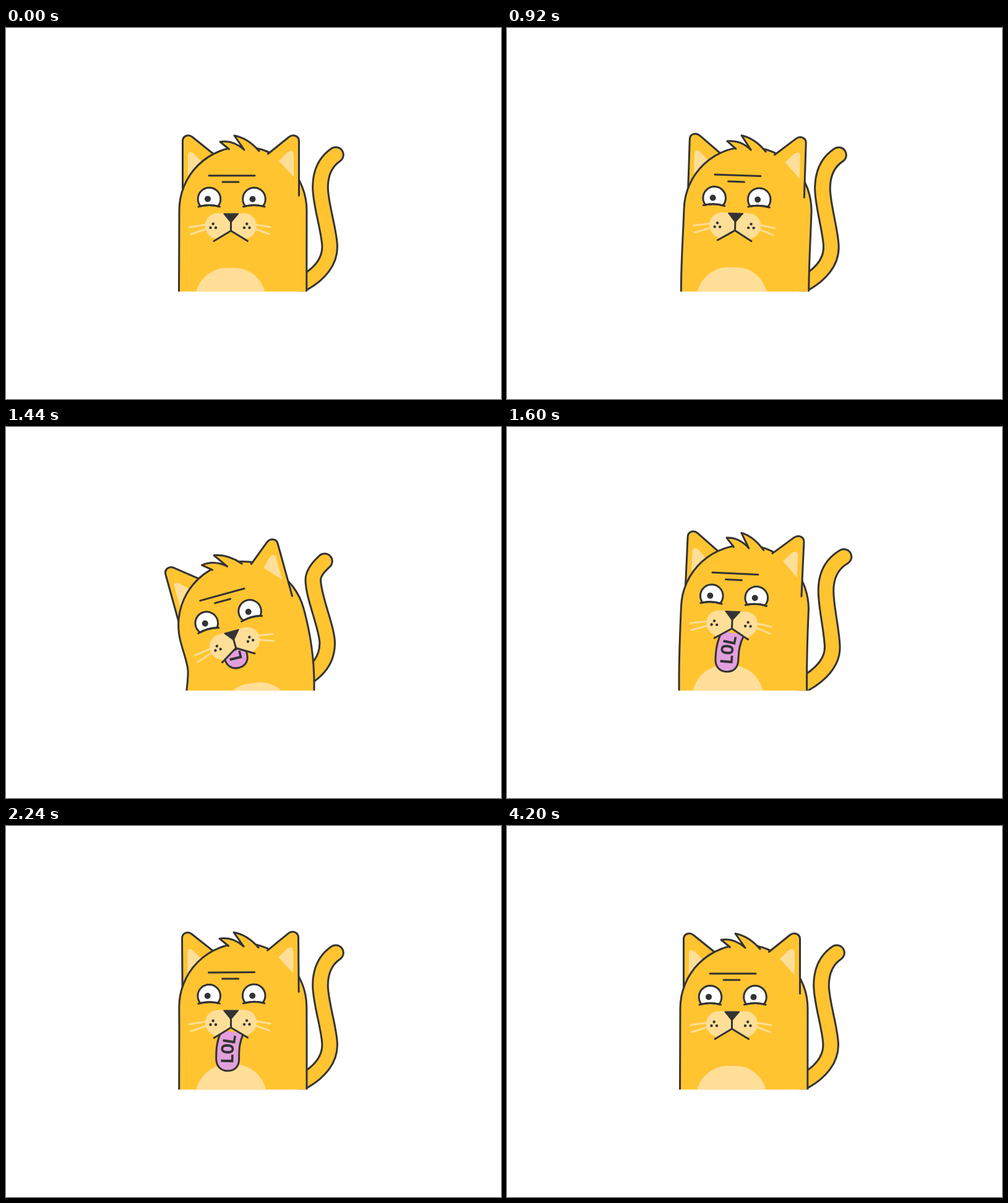
Write an HTML page that moves like this. It is 800 by 600 pixels and loops after 4.6 s.

```html
<!DOCTYPE html>
<html lang="en">
<head>
<meta charset="utf-8">
<title>Cat sticking out its tongue</title>
<style>
  html, body { margin: 0; width: 100%; height: 100%; overflow: hidden; background: #fff; }
  svg { display: block; width: 100%; height: 100%; }
  .line { fill: none; stroke: #333; stroke-width: 3; stroke-linecap: round; stroke-linejoin: round; }
  .fur { fill: #ffc430; }
  .cream { fill: #ffde98; }
  .dark { fill: #333; }
  .white { fill: #fff; }
  .pink { fill: #e29fdc; }
  .whisker { fill: none; stroke: #ffde98; stroke-width: 3; stroke-linecap: round; }
  .tail { fill: none; stroke-linecap: round; }
  .letters { font: 600 28px "Noto Sans Mono", monospace; fill: #333; text-anchor: middle; }
</style>
</head>
<body>
<svg viewBox="0 0 800 600">
  <defs>
    <clipPath id="floor"><rect width="800" height="426.2"/></clipPath>
    <clipPath id="mouth"><path d="M363.5 328L330 347.6V420H397V347.6Z"/></clipPath>
    <g id="eye">
      <path class="line white" d="M-14.2 11.6A18.3 18.3 0 1 1 14.2 11.6Q0 8.4 -14.2 11.6Z"/>
      <path class="line" d="M-17.5 12.5Q0 7.5 17 12.5"/>
    </g>
    <g id="dots" class="dark">
      <circle cy="-6" r="2.2"/><circle cx="-4.2" cy=".2" r="2.2"/><circle cx="4.3" cy=".2" r="2.2"/>
    </g>
  </defs>

  <g clip-path="url(#floor)">
    <path class="tail" stroke="#333" stroke-width="27.6"/>
    <path class="tail" stroke="#ffc430" stroke-width="21.6"/>

    <g class="head">
      <path class="line fur" d="M285.5 275V183C285.5 174.5 294.5 171 301.5 176.5L340 207.5"/>
      <path class="cream" d="M294 250V207Q294 197 303 202.5L322 222Z"/>
    </g>

    <path id="body" class="line fur"/>
    <path id="belly" class="cream" d="M305 480L307 426C315 401 336 388 356 388H370C390 388 411 401 418.5 426L420.5 480Z"/>

    <g class="head">
      <path class="line fur" d="M423.5 203.5L457 176.5C464 171 473.5 174.5 473.5 183V271"/>
      <path class="cream" d="M465 241L441 215L455 201Q465 195 465 206Z"/>
      <path id="hairFill" class="fur"/>
      <path id="hair" class="line"/>
      <path class="line" d="M328 238.8H402M350 249H376"/>

      <use href="#eye" x="328.5" y="276.5"/>
      <use href="#eye" x="401" y="276.5"/>
      <g id="pupils" class="dark">
        <circle cx="326" cy="276.4" r="5"/><circle cx="398.5" cy="276.8" r="5"/>
      </g>

      <path class="whisker" d="M296.5 322L324 318M298.5 333.5L324 325M403 318L427 322M403 325L425.5 333.3"/>
      <path class="cream" d="M343 299.5C331 299.5 322 308 322 319.5C322 331 330 339 340 341.5L363.5 328L387 341.5C397 339 405 331 405 319.5C405 308 396 299.5 384 299.5Z"/>

      <g clip-path="url(#mouth)">
        <g id="tongue">
          <path class="line pink" d="M348 333C340 350 339.3 364 339.3 378C339.3 391 347 398 358 398C370 398 376.2 390 376.2 379C376.2 362 377 352 384 337"/>
          <g class="letters">
            <text y="10" transform="translate(357.2 378) rotate(-88)">L</text>
            <text y="10" transform="translate(357.5 362.3) rotate(-87)">O</text>
            <text y="10" transform="translate(361 346.5) rotate(-81)">L</text>
          </g>
        </g>
      </g>

      <use href="#dots" x="334.7" y="322.8"/>
      <use href="#dots" x="389.2" y="322.8"/>
      <path class="dark" d="M352 299.5H375.5Q377 299.5 376 301L365 314Q363.5 316 362 314L351.5 301Q350.5 299.5 352 299.5Z"/>
      <path class="line" d="M363.5 312V328M336 344.5L363.5 328L390.5 344.5"/>
    </g>
  </g>
</svg>

<script>
const LOOP = 4600, STEP = 40;
const PIVOT = { x: 364.75, y: 276.5 };

// Head poses relative to rest; body, belly and tail follow from them.
const REST = { x: 0, y: 0, angle: 0 };
const WIND_UP = { x: 6.7, y: -0.5, angle: 1.9 };
const DIP = { x: -5.6, y: 31, angle: -15.4 };
const SPRING = { x: 4, y: -9.2, angle: 6.6 };
const LOLL = { x: -0.3, y: -2, angle: -0.4 };

const ease = p => p < 0.5 ? (2 * p) ** 2.5 / 2 : 1 - (2 - 2 * p) ** 2.5 / 2;
const ramp = (t, from, to) => ease(Math.min(1, Math.max(0, (t - from) / (to - from))));
const mix = (a, b, p) => ({
  x: a.x + (b.x - a.x) * p,
  y: a.y + (b.y - a.y) * p,
  angle: a.angle + (b.angle - a.angle) * p
});

function poseAt(t) {
  let pose = mix(REST, WIND_UP, ramp(t, 400, 960));
  pose = mix(pose, DIP, ramp(t, 960, 1440));
  pose = mix(pose, SPRING, ramp(t, 1440, 1680));
  pose = mix(pose, LOLL, ramp(t, 1680, 2000));
  return mix(pose, REST, ramp(t, 3760, 3880));
}

const tailSwing = t => 3 * ramp(t, 400, 960) - 21 * ramp(t, 960, 1440)
  + 36 * ramp(t, 1440, 1680) - 18 * ramp(t, 1680, 1920);
const hairLift = t => 1.2 * (ramp(t, 1500, 1720) - ramp(t, 1720, 2000));
const tongueOut = t => ramp(t, 1340, 1540) - ramp(t, 3760, 3880);
const pupilShift = t => 2.4 * (ramp(t, 2760, 2920) - ramp(t, 4000, 4200));

function bodyPath({ x, y, angle }) {
  const r = angle * Math.PI / 180, c = Math.cos(r), s = Math.sin(r);
  const place = (px, py) => {
    const dx = px - PIVOT.x, dy = py - PIVOT.y;
    return `${PIVOT.x + x + dx * c - dy * s} ${PIVOT.y + y + dx * s + dy * c}`;
  };
  const shift = 0.58 * x - angle, bend = -angle / 15;
  const left = 279.5 + shift, right = 485.8 + shift;
  return `M${left} 428C${left + 5 * bend} 385 ${place(280, 340)} ${place(280, 295)}` +
    `A103 103 0 0 1 ${place(486, 295)}` +
    `C${place(486, 340)} ${right + bend} 385 ${right} 428`;
}

function bellyTransform({ x, y, angle }) {
  const dx = 1.05 * x - 2.65 * angle, dy = y - 0.3 * Math.abs(angle);
  return `translate(${dx} ${dy}) rotate(${angle / 2} 362.5 388)`;
}

function tailPath(k) {
  const drop = 0.037 * k * k, lift = 0.25 * k;
  const mid = 508 + 0.65 * k, midY = 258 + 0.6 * k, low = 523.2 + 0.22 * k;
  return `M${533 + k} ${205 + drop}Q${mid} ${222 + drop} ${mid} ${midY}` +
    `C${mid} ${midY + 27} ${low} ${330 + lift} ${low} ${354 + lift}` +
    `C${low} ${377 + lift} 508 ${398 + lift} 478 ${414 + lift}`;
}

function hairPath(k) {
  return `M360.5 196L${346 + 5 * k} ${184 - 5 * k}Q${368 + 2 * k} ${181 - 2 * k} 385 197` +
    `L${369 + 6 * k} ${174 - 3 * k}Q${391 + 2 * k} ${178 - k} 409 199`;
}

const $ = id => document.getElementById(id);
const setAll = (selector, name, value) =>
  document.querySelectorAll(selector).forEach(el => el.setAttribute(name, value));

function draw(time) {
  const t = Math.floor(time % LOOP / STEP) * STEP;
  const pose = poseAt(t), hair = hairPath(hairLift(t)), hidden = 1 - tongueOut(t);

  setAll('.head', 'transform',
    `translate(${pose.x} ${pose.y}) rotate(${pose.angle} ${PIVOT.x} ${PIVOT.y})`);
  setAll('.tail', 'd', tailPath(tailSwing(t)));
  $('body').setAttribute('d', bodyPath(pose));
  $('belly').setAttribute('transform', bellyTransform(pose));
  $('hair').setAttribute('d', hair);
  $('hairFill').setAttribute('d', hair + 'Q385 204 360.5 196Z');
  $('tongue').setAttribute('transform', `translate(${4 * hidden} ${-76 * hidden})`);
  $('pupils').setAttribute('transform', `translate(${pupilShift(t)} 0)`);
}

const start = performance.now();
function tick() {
  draw(performance.now() - start);
  requestAnimationFrame(tick);
}
tick();
</script>
</body>
</html>
```
